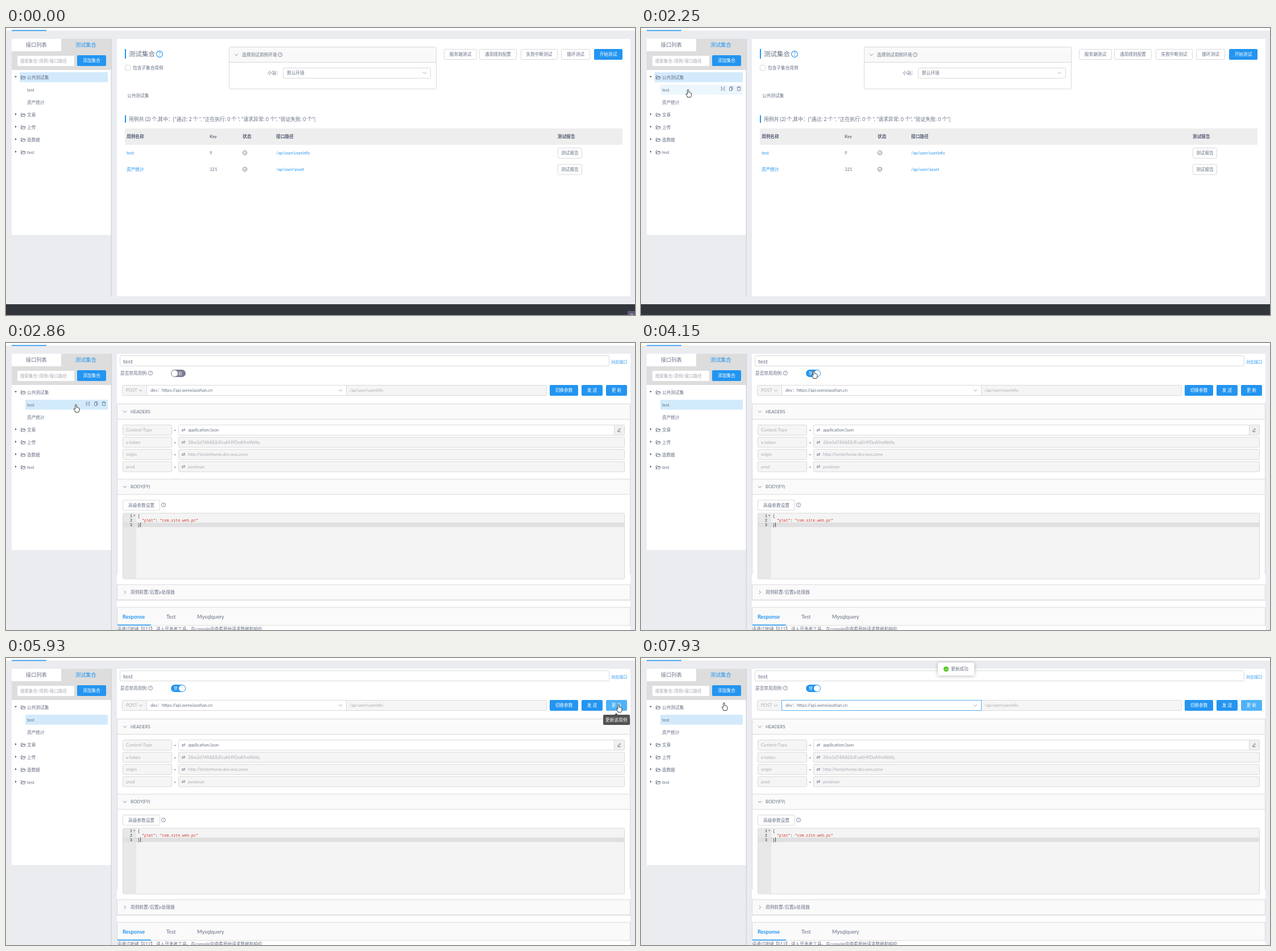
Recreate the animation shown at these times as an HTML page. Size 1106x506 px, loop 8 s.

```html
<!DOCTYPE html>
<html lang="zh-CN">
<head>
<meta charset="utf-8">
<style>
html, body { margin: 0; width: 100%; height: 100%; overflow: hidden; background: #ebecf0; }
svg { display: block; width: 1106px; height: 506px; }
text { font-family: Lato, "Noto Sans CJK SC", "Noto Sans CJK", sans-serif; white-space: pre; }
.mono { font-family: "Liberation Mono", monospace; }
</style>
</head>
<body>
<svg id="stage" viewBox="0 0 1106 506"></svg>
<script>
const LOOP = 8000, BLUE = '#2395f1', INK = '#687086', PALE = '#a9adb6', LINE = '#d9d9d9', RED = '#d5302c';
const SHIFT = 64.5; // height of the three extra header rows

// Drawing helpers; text is placed by its vertical centre
const rect = (x, y, w, h, fill, stroke = 'none', r = 0, more = '') =>
  `<rect x="${x}" y="${y}" width="${w}" height="${h}" rx="${r}" fill="${fill}" stroke="${stroke}" ${more}/>`;
const frame = (x, y, w, h, fill = '#fff', r = 2) => rect(x + .5, y + .5, w - 1, h - 1, fill, LINE, r);
const text = (s, x, y, fill = INK, size = 7.68, more = '') =>
  `<text x="${x}" y="${y + size * .37}" fill="${fill}" font-size="${size}" ${more}>${s}</text>`;
const bold = (s, x, y) => text(s, x, y, '#565e74', 7.68, 'font-weight="600"');
const mono = (s, x, y, fill = '#333', more = '') => text(s, x, y, fill, 6.58, `class="mono" ${more}`);
const path = (d, x = 0, y = 0, stroke = INK, w = .8, fill = 'none') =>
  `<path d="${d}" transform="translate(${x} ${y})" fill="${fill}" stroke="${stroke}" stroke-width="${w}"/>`;
const circle = (x, y, r, fill, stroke = 'none', w = .8, more = '') =>
  `<circle cx="${x}" cy="${y}" r="${r}" fill="${fill}" stroke="${stroke}" stroke-width="${w}" ${more}/>`;
const group = (id, body, more = '') => `<g id="${id}" ${more}>${body}</g>`;

const chevron = (x, y, color = INK) => path('M-3-1.5L0 1.7L3-1.5', x, y, color);
const chevronRight = (x, y) => path('M-1.5-3L1.7 0L-1.5 3', x, y);
const help = (x, y, r = 3.6, color = INK) => circle(x, y, r, 'none', color, r / 4.6) +
  text('?', x, y, color, r * 1.7, 'text-anchor="middle"');
const folder = y => path('M.5 6.5V.8H3L4 2H7V3.2M.5 6.5L2 3.2H8.3L7 6.5Z', 26, y - 3.5, '#5f687d', .8);
const caret = (y, open) => path(open ? 'M-2-1.2H2L0 1.5Z' : 'M-1-2V2L1.6 0Z', 17, y - 1, 'none', 0, '#555');
const swap = (x, y) => path('M-3-1H3L1-2.6M3 1H-3L-1 2.6', x, y);
const button = (s, x, y, w, h = 19, primary = false, id = '') =>
  (primary ? rect(x, y, w, h, BLUE, 'none', 2, id && `id="${id}"`) : frame(x, y, w, h)) +
  text(s, x + w / 2, y + h / 2, primary ? '#fff' : INK, 7.68, `text-anchor="middle" ${primary ? 'font-weight="500"' : ''}`);
const sectionHead = (s, y, open = true) => rect(195.5, y + .5, 902, 27, '#fafafa', LINE) +
  (open ? chevron : chevronRight)(209, y + 14) + text(s, 219, y + 14);

function sidebar() {
  const folders = [['文章', 153], ['上传', 175], ['造数据', 197], ['test', 219]];
  return rect(0, 0, 1106, 4.5, '#fff') + rect(10, 3.6, 61, 1.6, BLUE) +
    rect(10, 19, 175, 346, '#fff') + rect(97, 19, 88, 23, '#ddd') + rect(10, 41, 175, 33, '#ddd') +
    rect(184.5, 19, 1.3, 487, '#d0d2d8') +
    text('接口列表', 35, 30, INK, 9.2) + text('测试集合', 122, 30, BLUE, 9.2) +
    rect(20, 49, 100, 18, '#fff', 'none', 2) + text('搜索集合/用例/接口路径', 25, 58, '#a4a8b2', 7.5) +
    button('添加集合', 125, 48, 51, 19, true) +
    rect(24, 78, 155, 17.5, '#d2eafb', 'none', 1, 'id="rootRow"') +
    rect(34, 100, 145, 17.5, '#ecf6fd', 'none', 1, 'id="caseRow"') +
    caret(87, true) + folder(87) + text('公共测试集', 37, 87) +
    text('test', 37, 109) + text('资产统计', 37, 131) +
    group('rowIcons',
      path('M-3-1V-3H-1M1-3H3V-1M3 1V3H1M-1 3H-3V1M-3 0H3', 144, 107) +
      path('M-2.5-2V3.5H1.5V-2ZM-1-2V-3.5H3V2H1.5', 158, 107) +
      path('M-3.4-2.2H3.4M-1.2-2.2V-3.5H1.2V-2.2M-2.4-2.2V3.3H2.4V-2.2', 172, 107)) +
    folders.map(([s, y]) => caret(y) + folder(y) + text(s, 37, y)).join('');
}

function collection() {
  const tick = y => circle(420, y, 3.6, 'none', INK, .9) + path('M-1.6 0L-.3 1.3L1.8-1.2', 420, y, INK, .9);
  const row = (name, key, url, y) => text(name, 212, y, BLUE) + text(key, 358, y) + tick(y) +
    text(url, 475, y, BLUE) + button('测试报告', 970, y - 9, 43);
  const heads = [['用例名称', 212], ['Key', 358], ['状态', 416], ['接口路径', 475], ['测试报告', 970]];
  return rect(195, 19, 903, 454, '#fff') + rect(184, 473, 3, 14, '#ebecf0') + rect(0, 487, 1106, 19, '#32363a') +
    rect(209, 37, 2, 17, BLUE) + text('测试集合', 216, 46, INK, 11.5) + help(270, 46, 5.4, BLUE) +
    frame(209, 65, 10, 10, '#fff', 1) + text('包含子集合用例', 223, 70) +
    frame(392, 33, 365, 75) + rect(392.5, 33.5, 364, 27, '#f9f9f9', LINE, 2) +
    chevron(405, 47) + text('选择测试用例环境', 415, 47) + help(482, 47) +
    text('小站：', 460, 79) + frame(487, 70, 260, 19) + text('默认环境', 494, 79) + chevron(736, 79, '#999') +
    text('公共测试集', 213, 119) +
    button('服务端测试', 770, 37, 58) + button('通用规则配置', 832, 37, 66) +
    button('失败中断测试', 905, 37, 65) + button('循环测试', 976, 37, 51) + button('开始测试', 1034, 37, 50, 19, true) +
    rect(209, 154, 2, 13, BLUE) +
    text('用例共 (2) 个,其中：["通过: 2 个 ", "正在执行: 0 个 ", "请求异常: 0 个", "验证失败: 0 个"]', 216, 161, INK, 8.77) +
    rect(209, 177, 875, 29, '#eee') + heads.map(([s, x]) => bold(s, x, 191)).join('') +
    row('test', '9', '/ap/user/userinfo', 220) + row('资产统计', '321', '/ap/user/asset', 249);
}

function headerRow(name, value, i) {
  const y = 144 + i * 21.5, mid = y + 9.5, editable = i === 0;
  return frame(205, y, 87, 19, '#f5f5f5') + text(name, 211, mid, PALE) + text('=', 295, mid) +
    frame(303, y, 785, 19, editable ? '#fff' : '#f5f5f5') + swap(312, mid) +
    text(value, 320, mid, editable ? INK : PALE) +
    (editable ? frame(1069, y, 19, 19, '#f0f0f0') + path('M-2.5 3H3M-2 1.2L1.2-3L2.6-1.8L-.6 1.8L-2.2 2Z', 1078, mid) : '');
}

function requestTop() {
  return rect(195, 19, 903, 487, '#fff') +
    frame(200, 22, 861, 19) + text('test', 206, 32, INK, 10, 'id="caseName"') +
    text('对应接口', 1064, 33.5, BLUE, 7.1) + text('是否禁用用例:', 201, 53) + help(254, 53) +
    rect(290, 47, 26, 13, '#7d7d96', 'none', 6.5, 'id="track"') +
    text('启', 303, 53.5, '#fff', 6.8, 'id="labelOff"') + text('禁', 295, 53.5, '#fff', 6.8, 'id="labelOn"') +
    circle(0, 53.5, 5.5, '#fff', 'none', 0, 'id="knob"') +
    frame(204, 74, 44, 19, '#f5f5f5') + text('POST', 211, 83.5, PALE) + chevron(237, 83.5, '#999') +
    frame(598, 74, 353, 19, '#f5f5f5') + text('/ap/user/userinfo', 604, 83.5, PALE) +
    rect(247.5, 74.5, 351, 18, '#fff', LINE, 0, 'id="envBox"') +
    text('dev：https://api.wenxiaozhan.cn', 254, 83.5) + chevron(588, 83.5, '#999') +
    button('切换参数', 956, 74, 50, 19, true) + button('发 送', 1012, 74, 37, 19, true) +
    button('更 新', 1055, 74, 37, 19, true, 'update') +
    rect(195.5, 107.5, 902, 300, '#fff', LINE) + sectionHead('HEADERS', 107) +
    headerRow('Content-Type', 'application/json', 0) +
    group('extraRows', headerRow('x-token', '28m3d74XAE8JFzaKH9DeA9mWeYq', 1) +
      headerRow('origin', 'http://testerhome.dev.wss.zone', 2) + headerRow('prod', 'postman', 3));
}

function requestBottom() {
  const lineNo = (n, x, y, fold) => mono(n, x, y, '#333', 'text-anchor="end"') +
    (fold ? path('M-1.5-1H1.5L0 1Z', x + 3.6, y, 'none', 0, '#555') : '');
  const pair = (key, value, x, y, color = RED, tail = ',') =>
    mono(`"${key}": <tspan fill="${color}">${value}</tspan>${tail}`, x, y);
  const allow = ['allow-headers', 'allow-methods', 'allow-origin', 'expose-headers'];
  return rect(196, 175, 901, 420, '#fff') + sectionHead('BODY(F9)', 175) +
    button('高级参数设置', 205, 212, 66) + help(277, 221) +
    frame(205, 235, 883, 117, '#f4f4f4') + rect(206, 236, 23, 115, '#e8e8e8') + rect(206, 252, 881, 8, '#e0e0e0') +
    lineNo(1, 222, 240, true) + lineNo(2, 222, 248) + lineNo(3, 222, 256) +
    mono('{', 231.5, 240) + mono('"plat"<tspan fill="#333">:</tspan> "com.site.web.pc"', 239, 248, RED) + mono('}', 231.5, 256) +
    rect(236, 252, .8, 8, '#222') +
    sectionHead('用例前置/后置js处理器', 361, false) + rect(195, 389, 903, 200, '#fff') + rect(195, 388.5, 903, 1, LINE) +
    rect(195.5, 401.5, 902, 32, '#fafafa', LINE) + rect(196, 432, 59, 1.6, BLUE) +
    text('Response', 205, 418, BLUE, 9.2, 'font-weight="700"') + text('Test', 282, 418, INK, 9.2) +
    text('Mysqlquery', 336, 418, INK, 9.2) +
    text('请通过按键【F12】 进入开发者工具，在console中查看原始请求数据和响应', 195, 440) +
    bold('Headers', 201, 456) + bold('Body', 447, 456) +
    frame(201, 469, 228, 80, '#f5f5f5') + rect(438, 469, 1, 80, '#b9b9d0') +
    frame(446, 469, 642, 80, '#f5f5f5') + rect(447, 470, 27, 80, '#e8e8e8') +
    mono('{', 204, 474.5) + allow.map((s, i) => pair('access-control-' + s, '"*"', 212, 482.5 + i * 8)).join('') +
    [1, 2, 3, 4, 5].map(n => lineNo(n, 468, 466.5 + n * 8, n === 1 || n === 4)).join('') +
    mono('{', 477, 474.5) + pair('code', '0', 485, 482.5, '#3a00dc') + pair('message', '"success"', 485, 490.5) +
    mono('"data": {', 485, 498.5) + pair('userid', '"76n3vdl4.bn"', 493, 506.5);
}

const tooltip = rect(1050, 100, 47, 18, '#525252', 'none', 2) + path('M-3 3L0 0L3 3Z', 1073, 97, 'none', 0, '#525252') +
  text('更新该用例', 1054, 109, '#fff');
const toast = rect(522, 8, 64, 23, '#fff', 'none', 2, 'style="filter:drop-shadow(0 1px 3px #0004)"') +
  circle(536.5, 19.5, 4.5, '#52c41a') + path('M-2 0L-.5 1.6L2.2-1.5', 536.5, 19.5, '#fff', 1) + text('更新成功', 545, 19.5);
const corner = rect(1093, 499, 13, 7, '#5d5c78') + rect(1097, 503, 6, 3, '#8583a8');
const pointer =
  group('hand', path('M-1.2 8V.6Q0-1 1.2.6V5Q2.5 4.4 3.1 5.4Q4.4 5 4.7 6.1Q5.9 6.1 5.9 7.5V10Q5.9 12 4.7 13.6H-1Q-1.5 11-3.8 8.3Q-3.6 6.5-1.2 8Z', 0, 0, '#222', .9, '#fff')) +
  group('arrow', path('M0 0V11L2.6 8.6L4.4 12.6L6 11.8L4.3 8H7.8Z', 0, 0, '#222', .8, '#fff'));

document.getElementById('stage').innerHTML = sidebar() + group('collection', collection()) +
  group('request', requestTop() + group('lower', requestBottom())) +
  group('tooltip', tooltip) + group('toast', toast) + group('corner', corner) + group('pointer', pointer);

const el = id => document.getElementById(id);
const show = (id, opacity) => el(id).setAttribute('opacity', +opacity);
const fill = (id, color) => el(id).setAttribute('fill', color);
const move = (id, x, y) => el(id).setAttribute('transform', `translate(${x} ${y})`);
const clamp = v => Math.min(1, Math.max(0, v));
const ease = v => v * v * (3 - 2 * v);
const ramp = (t, from, to) => ease(clamp((t - from) / (to - from)));
const mix = (a, b, k) => 'rgb(' + a.map((v, i) => Math.round(v + (b[i] - v) * k)) + ')';

const WHITE = [255, 255, 255], HOVER = [236, 246, 253], SELECTED = [210, 234, 251];
const route = [ // time, x, y of the pointer tip
  [330, 1040, 496], [1120, 89, 120], [1190, 89, 120], [1450, 82.7, 108.5], [2859, 82.7, 108.5], [2860, 123, 108.5],
  [3540, 300, 43], [3640, 300, 43], [3670, 304, 49], [4560, 304, 49], [5470, 1066, 61], [5600, 1068, 66],
  [5900, 1077, 82], [7360, 1077, 82], [7930, 146, 79]
];
const clickable = [[24, 78, 155, 150], [290, 42, 26, 18], [204, 74, 395, 19], [1055, 74, 37, 19]];

function pointerAt(t) {
  const next = route.findIndex(p => p[0] > t);
  if (next < 1) return route.at(next).slice(1);
  const [t0, x0, y0] = route[next - 1], [t1, x1, y1] = route[next], k = ease((t - t0) / (t1 - t0));
  return [x0 + (x1 - x0) * k, y0 + (y1 - y0) * k];
}

function render(t) {
  const opened = t >= 2390, loaded = t >= 2530;
  show('collection', !opened);
  show('request', opened);
  show('extraRows', loaded);
  show('caseName', loaded);
  move('lower', 0, loaded ? SHIFT : 0);

  const select = ramp(t, 2390, 2660);
  fill('rootRow', mix(SELECTED, WHITE, select));
  fill('caseRow', opened ? mix(HOVER, SELECTED, select) : mix(WHITE, HOVER, ramp(t, 1190, 1450)));
  show('rowIcons', t >= 1190 && t < 3050);

  const on = ramp(t, 3810, 4100);
  fill('track', mix([125, 125, 150], [35, 149, 241], on));
  el('knob').setAttribute('cx', 296.5 + 13 * on);
  show('labelOff', on < .5);
  show('labelOn', on >= .5);

  const [x, y] = pointerAt(t);
  fill('update', mix([35, 149, 241], [78, 178, 248], ramp(t, 5650, 5880)));
  el('envBox').setAttribute('stroke', mix([217, 217, 217], [90, 175, 240], t > 7400 ? ramp(-x, -640, -480) : 0));
  show('tooltip', ramp(t, 5720, 5910) * (1 - ramp(t, 7480, 7650)));
  const drop = ramp(t, 7070, 7330);
  show('toast', drop);
  move('toast', 0, -12 * (1 - drop));
  show('corner', t < 70);

  const hand = clickable.some(([l, top, w, h]) => x >= l && x <= l + w && y >= top && y <= top + h);
  show('pointer', t >= 330);
  show('hand', hand);
  show('arrow', !hand);
  move('pointer', x, y);
}

const start = performance.now();
function tick() {
  render((performance.now() - start) % LOOP);
  requestAnimationFrame(tick);
}
tick();
</script>
</body>
</html>
```
